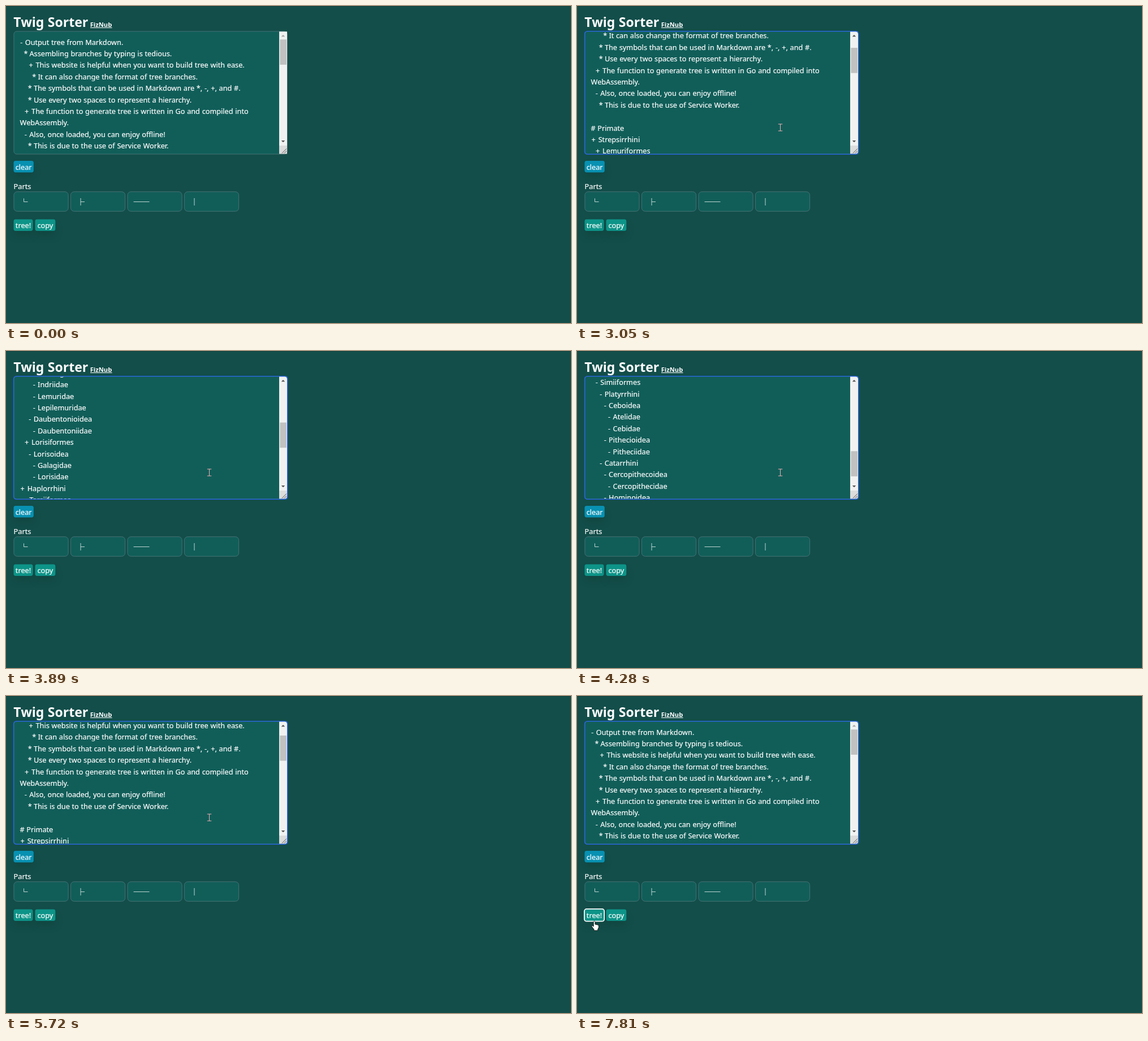
An HTML page that plays this animation: 999x561 px, repeating every 8 s.

```html
<!DOCTYPE html>
<html lang="en">
<head>
<meta charset="utf-8">
<title>Twig Sorter</title>
<style>
  html, body { margin: 0; width: 100%; height: 100%; overflow: hidden; background: #134e4a; }
  svg { display: block; width: 100vw; height: 100vh; }
  text { font: 12.7px "Noto Sans", "Open Sans", sans-serif; fill: #fff; stroke: #fff; stroke-width: .2; word-spacing: .43px; white-space: pre; }
  .title { font-size: 23px; font-weight: 600; stroke: none; }
  .link { font-size: 11.2px; font-weight: 600; stroke: none; }
  .mid { text-anchor: middle; }
  .field { fill: #115e59; stroke: #4b7478; stroke-width: .9; }
  .button { filter: drop-shadow(0 9px 7px rgba(0, 0, 0, .1)); }
  .part { fill: none; stroke: #d3e2e0; stroke-width: .9; }
  .pointer { fill: #fff; stroke: #111; stroke-width: .9; stroke-linejoin: round; }
</style>
</head>
<body>
<svg viewBox="0 0 999 561" preserveAspectRatio="none">
  <defs><clipPath id="view"><rect x="14" y="45.5" width="469" height="216.3"/></clipPath></defs>
  <rect width="999" height="561" fill="#134e4a"/>
  <rect width="999" height="1" fill="#0f403d"/>

  <text class="title" x="13.3" y="36.5">Twig Sorter</text>
  <text class="link" x="148.7" y="37">FizNub</text>
  <path d="M149 38.5H187.5" stroke="#fff"/>

  <rect class="field" x="13.9" y="44.9" width="483.4" height="217.2" rx="5"/>
  <g clip-path="url(#view)">
    <g id="content"><path id="caret" d="M111.5 196.5V215" stroke="#fff"/></g>
  </g>

  <path d="M483 45.3H497V247H483Z" fill="#f1f1f1"/>
  <rect id="thumb" x="484.3" y="59.3" width="11.7" height="44.6" fill="#c1c1c1"/>
  <path id="up" d="M486.8 54.3L490 51L493.2 54.3Z"/>
  <path id="down" d="M486.8 238L490 241.3L493.2 238Z"/>
  <path d="M483 247H497V261.7H483Z" fill="#dcdcdc"/>
  <path d="M488 260.5L496 252.5M492 260.5L496 256.5" stroke="#555" fill="none"/>
  <rect id="focus" x="13.5" y="44.6" width="484.2" height="217.8" rx="5" fill="none" stroke="#2563eb" stroke-width="1.4"/>

  <g id="controls"></g>
  <text x="13.6" y="323.6">Parts</text>
  <path class="part" d="M31.5 340.5V346.5H38.5M132 340V353M132 346.5H139M225.5 346.5H253.5M333 340V353"/>
  <rect id="pressed" x="13" y="376.9" width="35.2" height="21.8" rx="4" fill="none" stroke="#fff" stroke-width="1.8"/>

  <g id="cursor">
    <path id="arrow" class="pointer" d="M.5 .5V13.6L3.5 10.8L5.5 15.4L7.7 14.4L5.8 10H10.2Z"/>
    <path id="beam" d="M-3.7 -6H3.7M0 -6V6M-3.7 6H3.7" fill="none" stroke="#f0b0b4"/>
    <path id="hand" class="pointer" d="M-1.8 1.5Q-.4 -1.5 1 1.5V6L5.5 7Q7.4 7 7.4 9V11.6L5.8 15V17H-1V15L-5 9.8Q-5 8 -3.6 8.4L-1.8 10Z"/>
  </g>
</svg>
<script>
const LOOP = 8000, LINE = 20.4, MAX_SCROLL = 632.4, THUMB_TRAVEL = 128.7;
const byId = id => document.getElementById(id);

const outline = `- Output tree from Markdown.
  * Assembling branches by typing is tedious.
    + This website is helpful when you want to build tree with ease.
      * It can also change the format of tree branches.
    * The symbols that can be used in Markdown are *, -, +, and #.
    * Use every two spaces to represent a hierarchy.
  + The function to generate tree is written in Go and compiled into
WebAssembly.
  - Also, once loaded, you can enjoy offline!
    * This is due to the use of Service Worker.

# Primate
+ Strepsirrhini
  + Lemuriformes
    - Lemuroidea
      - Cheirogaleidae
      - Indriidae
      - Lemuridae
      - Lepilemuridae
    - Daubentonioidea
      - Daubentoniidae
  + Lorisiformes
    - Lorisoidea
      - Galagidae
      - Lorisidae
+ Haplorrhini
  - Tarsiiformes
    - Tarsiidae
  - Simiiformes
    - Platyrrhini
      - Ceboidea
        - Atelidae
        - Cebidae
      - Pithecioidea
        - Pitheciidae
    - Catarrhini
      - Cercopithecoidea
        - Cercopithecidae
      - Hominoidea
        - Hylobatidae
        - Hominidae`;

function add(parent, tag, attrs, text = '') {
  const node = document.createElementNS('http://www.w3.org/2000/svg', tag);
  for (const key in attrs) node.setAttribute(key, attrs[key]);
  node.textContent = text;
  parent.append(node);
}

const SPACE = 3.73;
const markerWidth = { '-': 5.4, '*': 5.7, '+': 9.3, '#': 8 };
outline.split('\n').forEach((line, row) => {
  const [, indent, marker, body] = line.match(/^( *)(?:([-*+#]) )?(.*)$/);
  const x = 24.6 + indent.length * SPACE, y = 68.5 + row * LINE;
  const width = markerWidth[marker];
  if (marker) add(byId('content'), 'text', { x: x + width / 2, y, class: 'mid' }, marker);
  add(byId('content'), 'text', { x: marker ? x + width + SPACE : x, y }, body);
});

const controls = byId('controls');
const inputLeft = i => 13.9 + i * 100.5;
for (let i = 0; i < 4; i++)
  add(controls, 'rect', { x: inputLeft(i), y: 328.7, width: 96.2, height: 34.6, rx: 6, class: 'field' });

function addButton(label, x, y, width, fill) {
  add(controls, 'rect', { x, y, width, height: 20.4, rx: 3.4, fill, class: 'button' });
  add(controls, 'text', { x: x + width / 2, y: y + 15.6, class: 'mid' }, label);
}
addButton('clear', 13.5, 274, 35.3, '#0891b2');
addButton('tree!', 13.5, 377.6, 34, '#0d9488');
addButton('copy', 51.5, 377.6, 35.8, '#0d9488');

const clamp = p => Math.min(1, Math.max(0, p));
const ease = p => p * p * (3 - 2 * p);

// Each glide eases a value towards its target between two times
const glide = (t, value, start, end, target) =>
  value + (target - value) * ease(clamp((t - start) / (end - start)));

function scrollAt(t) {
  const nudged = glide(t, 0, 2900, 3100, 85);
  const bottom = glide(t, nudged, 3360, 4500, MAX_SCROLL);
  return glide(t, bottom, 5190, 5835, 0);
}

const cursorStops = [
  { start: 130, end: 350, at: [664, 387] },
  { start: 550, end: 800, at: [403, 235] },
  { start: 1080, end: 1330, at: [359.5, 215] },
  { start: 6480, end: 6710, at: [160, 287] },
  { start: 6920, end: 7600, at: [31, 398] },
];
const cursorAt = t => cursorStops.reduce(
  (point, { start, end, at }) => point.map((v, i) => glide(t, v, start, end, at[i])),
  [900, 520]);

const within = (v, from, size) => v > from && v < from + size;

function cursorKind(x, y) {
  const overText = within(x, 14, 469) && within(y, 45, 217);
  const overInput = within(y, 329, 34) && within((x - inputLeft(0)) % 100.5, 0, 96) && x < 411;
  if (overText || overInput) return 'beam';
  return within(x, 13, 35) && within(y, 377, 22) ? 'hand' : 'arrow';
}

const caretOn = t => t >= 1730 && (t - 1730) % 888 < 430;
const show = (id, on) => byId(id).setAttribute('visibility', on ? 'visible' : 'hidden');

function render(t) {
  const scroll = scrollAt(t);
  byId('content').setAttribute('transform', `translate(0 ${-scroll})`);
  byId('thumb').setAttribute('y', 59.3 + scroll / MAX_SCROLL * THUMB_TRAVEL);
  byId('up').setAttribute('fill', scroll > 0 ? '#505050' : '#a3a3a3');
  byId('down').setAttribute('fill', scroll < MAX_SCROLL ? '#505050' : '#a3a3a3');
  byId('focus').setAttribute('opacity', clamp((t - 1700) / 150));
  show('pressed', t >= 7620);
  show('caret', caretOn(t));

  const [x, y] = cursorAt(t);
  byId('cursor').setAttribute('transform', `translate(${x} ${y})`);
  const kind = cursorKind(x, y);
  for (const id of ['arrow', 'beam', 'hand']) show(id, t >= 200 && id === kind);
}

const began = performance.now();
function tick() {
  render((performance.now() - began) % LOOP);
  requestAnimationFrame(tick);
}
tick();
</script>
</body>
</html>
```
